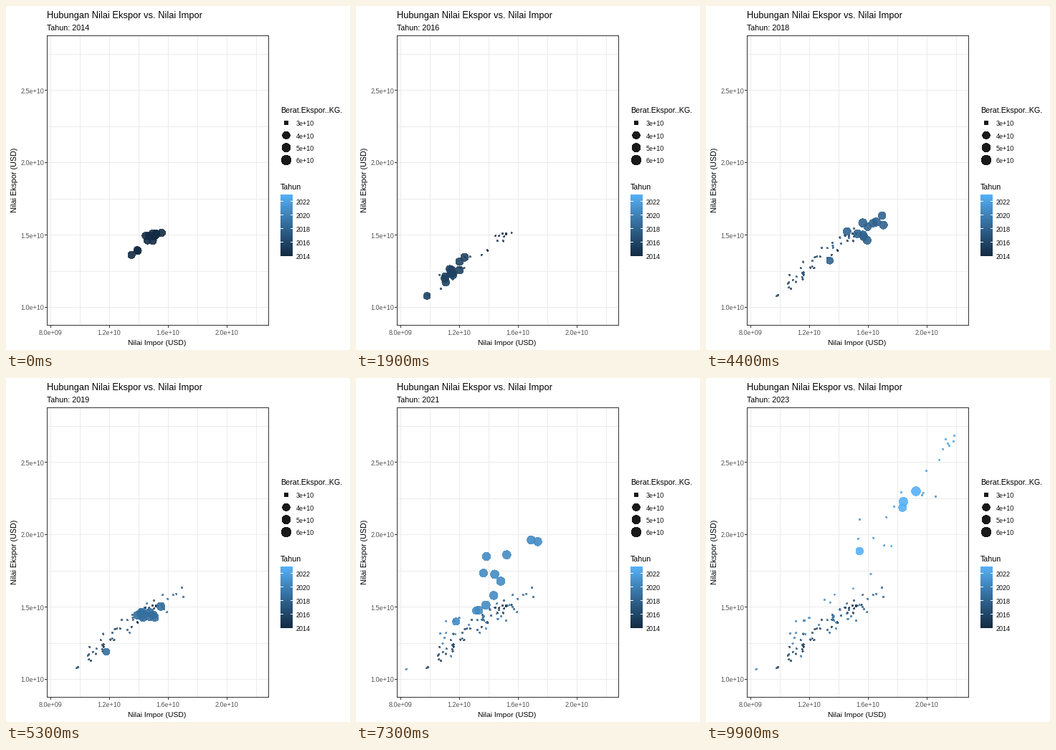
These frames come from a looping animation (480 px wide and 480 px high, 10 s). A matplotlib script:

```python
import numpy as np
import matplotlib.pyplot as plt
from matplotlib.animation import FuncAnimation

SIZE, DPI = 480, 72
FRAMES, STEP, FIRST, LAST = 100, 11, 2014, 2023
MONTHS = 112
ALPHA = 0.9
GRID, FRAME, TICK = "#ebebeb", "#333333", "#4d4d4d"
LEFT, RIGHT, TOP, BOTTOM = 57, 366, 41, 445

# Turning points of the trade trend: month, import, export (billion USD)
TREND = np.array([
    (0, 14.6, 14.6), (9, 15.0, 14.8), (12, 12.4, 13.1), (24, 10.6, 11.3),
    (35, 12.7, 13.5), (47, 14.6, 15.0), (55, 17.0, 15.8), (63, 13.9, 13.9),
    (71, 14.6, 14.3), (76, 10.8, 12.4), (81, 10.8, 13.8), (84, 13.3, 15.2),
    (88, 16.7, 18.6), (92, 16.2, 21.0), (95, 21.0, 22.8), (96, 17.5, 19.6),
    (98, 21.2, 26.2), (103, 21.5, 26.6), (108, 18.4, 22.3), (111, 19.5, 23.0),
])


def px(v):
    return 62 + (np.asarray(v) - 8) * 20.49


def py(v):
    return 420 - (np.asarray(v) - 10) * 20.18


def make_dots():
    """One row per month: x, y and radius in pixels."""
    rng = np.random.default_rng(14)
    m = np.arange(MONTHS)
    year, month = np.divmod(m, 12)

    # The holiday slump comes one month earlier every three years
    slump = (month == 6 - year // 3) * np.minimum(year / 2, 1)
    shared, a, b, c = np.clip(rng.normal(size=(4, MONTHS)), -1.6, 1.6)
    imports = np.interp(m, TREND[:, 0], TREND[:, 1]) * (1 - 0.2 * slump)
    exports = np.interp(m, TREND[:, 0], TREND[:, 2]) * (1 - 0.17 * slump)
    imports += 0.35 * shared + 0.35 * a
    exports += 0.35 * shared + 0.25 * b
    radius = 5.1 + 0.1 * year + 0.2 * c - 0.7 * slump - 0.5 * (month == 1)
    return np.column_stack([px(imports), py(exports), radius])


# Colour ramp, linear in CIE Lab
RGB2XYZ = np.array([[0.4124, 0.3576, 0.1805],
                    [0.2126, 0.7152, 0.0722],
                    [0.0193, 0.1192, 0.9505]])
WHITE = RGB2XYZ.sum(axis=1)
XYZ2LAB = np.array([[0, 116, 0], [500, -500, 0], [0, 200, -200]])


def to_lab(rgb):
    c = np.array(rgb) / 255
    c = np.where(c > 0.04045, ((c + 0.055) / 1.055) ** 2.4, c / 12.92)
    t = RGB2XYZ @ c / WHITE
    return XYZ2LAB @ np.where(t > 0.008856, np.cbrt(t), 7.787 * t + 16 / 116)


def to_rgb(lab):
    f = np.linalg.solve(XYZ2LAB, lab)
    t = np.where(f > 0.2069, f ** 3, (f - 16 / 116) / 7.787)
    c = np.clip(np.linalg.solve(RGB2XYZ, t * WHITE), 0, 1)
    return np.where(c > 0.0031308, 1.055 * c ** (1 / 2.4) - 0.055, 12.92 * c)


LOW, HIGH = to_lab((19, 43, 67)), to_lab((86, 177, 247))


def ramp(u):
    return np.clip(to_rgb(LOW + (HIGH - LOW) * u), 0, 1)


plt.rcParams.update({"font.family": "Liberation Sans", "text.hinting": "native"})
fig = plt.figure(figsize=(SIZE / DPI, SIZE / DPI), dpi=DPI, facecolor="white")
ax = fig.add_axes([0, 0, 1, 1])
ax.axis("off")


def line(x0, y0, x1, y1, color, z=1):
    ax.plot([x0, x1], [y0, y1], color=color, lw=1, zorder=z,
            antialiased=False, solid_capstyle="butt")


def label(x, y, s, size=10.7, color="black", **kw):
    return ax.text(x, y, s, fontsize=size, color=color, **kw)


def circles(**kw):
    return ax.scatter([], [], lw=0, antialiased=False, **kw)


def draw_panel():
    for v in range(8, 23, 2):
        x = round(float(px(v)))
        line(x, TOP, x, BOTTOM, GRID)
        if v % 4 == 0:
            line(x, BOTTOM, x, BOTTOM + 3, FRAME, 6)
            text = "8.0e+09" if v == 8 else f"{v / 10:.1f}e+10"
            label(x, 459, text, 9, TICK, ha="center")
    for v in np.arange(10, 28, 2.5):
        y = round(float(py(v)))
        line(LEFT, y, RIGHT, y, GRID)
        if v % 5 == 0:
            line(LEFT - 3, y, LEFT, y, FRAME, 6)
            label(53, y + 4.5, f"{v / 10:.1f}e+10", 9, TICK, ha="right")
    ax.add_patch(plt.Rectangle((LEFT, TOP), RIGHT - LEFT, BOTTOM - TOP, fill=False,
                               ec=FRAME, lw=1, zorder=6, antialiased=False))
    label(57, 17, "Hubungan Nilai Ekspor vs. Nilai Impor", 12.9)
    label(211, 473, "Nilai Impor (USD)", 10.4, ha="center")
    label(12.5, 243, "Nilai Ekspor (USD)", rotation=90, ha="center", va="center")


def draw_legends():
    label(383, 149, "Berat.Ekspor..KG.")
    rows = 163 + 17.28 * np.arange(4)
    radius = 3 + 3.6 * np.sqrt(np.arange(4) / 3)
    keys = circles(color="black", alpha=ALPHA)
    keys.set_offsets(np.column_stack([np.full(4, 391), rows]))
    keys.set_sizes((2 * radius) ** 2)
    for i, y in enumerate(rows):
        label(405, y + 4.4, f"{i + 3}e+10", 9)

    label(383, 256, "Tahun")
    x0, x1, y0, y1 = 383, 400, 263, 349
    bar = np.array([[ramp(u)] for u in np.linspace(1, 0, y1 - y0)])
    ax.imshow(bar, extent=(x0, x1, y1, y0), aspect="auto",
              interpolation="nearest", zorder=2)
    for year in range(FIRST, LAST, 2):
        y = y1 - (year - FIRST) / (LAST - FIRST) * (y1 - y0)
        line(x0, int(y), x0 + 3, int(y), "white", 3)
        line(x1 - 3, int(y), x1, int(y), "white", 3)
        label(405, y + 4, str(year), 9)


draw_panel()
draw_legends()
ax.set(xlim=(0, SIZE), ylim=(SIZE, 0))

DOTS = make_dots()
COLORS = np.array([ramp(m // 12 / (LAST - FIRST)) for m in range(MONTHS)])

subtitle = label(57, 34, "")
trail = circles(s=4.5, alpha=0.8, zorder=4)
dots = circles(alpha=ALPHA, zorder=5)


def update(k):
    year, step = divmod(k, STEP)
    now = DOTS[12 * year:12 * year + 12]
    if step:
        later = DOTS[12 * year + 12:12 * year + 24]
        now = now[:len(later)]
        now = now + (later - now) * step / STEP
    dots.set_offsets(now[:, :2])
    dots.set_sizes((2 * now[:, 2]) ** 2)
    dots.set_facecolor(ramp(k / (FRAMES - 1)))

    past = 12 * (year + (step > 0))
    trail.set_offsets(DOTS[:past, :2])
    trail.set_facecolor(COLORS[:past])
    subtitle.set_text(f"Tahun: {FIRST + round(k / STEP)}")
    return trail, dots, subtitle


anim = FuncAnimation(fig, update, frames=FRAMES, interval=100,
                     repeat=True, repeat_delay=0)
plt.show()
```
